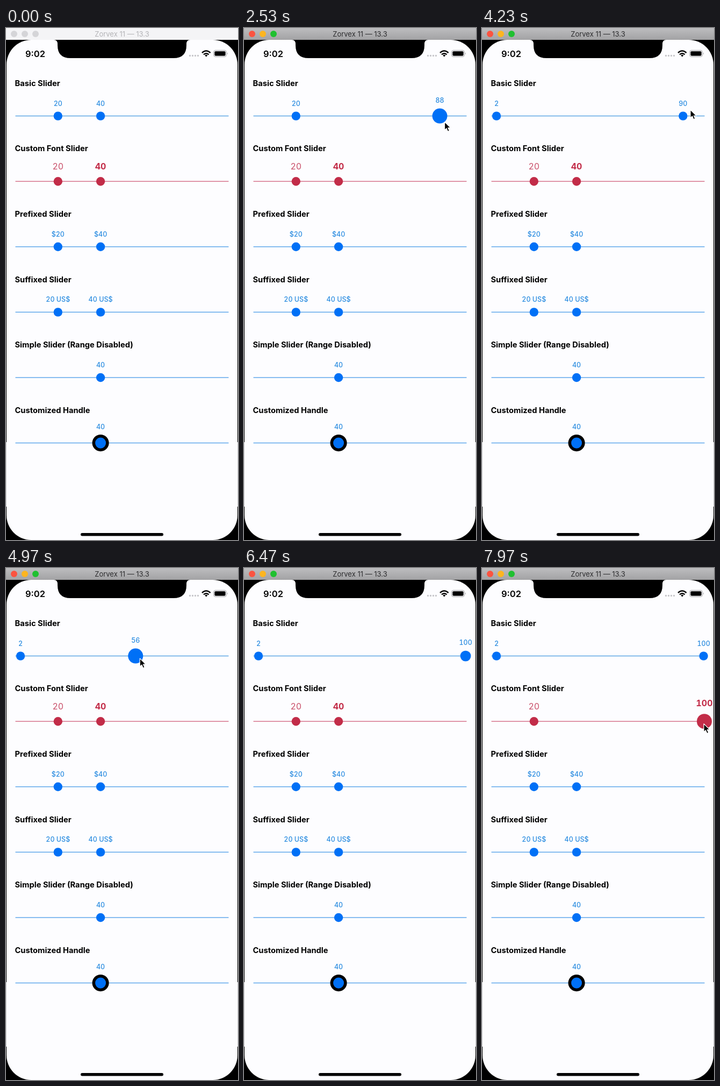
Write an HTML page that moves like this. It is 432 px wide and 952 px high and loops after 8 s.

```html
<!DOCTYPE html>
<html lang="en">
<head>
<meta charset="utf-8">
<title>Range sliders</title>
<style>
  html, body { margin: 0; width: 100%; height: 100%; overflow: hidden; background: #000; }
  svg { display: block; width: 432px; height: 952px; font-family: Inter, "Open Sans", sans-serif; }
  .heading { font-size: 14.7px; font-weight: 700; fill: #000; }
  .label { font-size: 12.5px; font-weight: 500; text-anchor: middle; font-variant-numeric: tabular-nums; }
  .label.large { font-size: 16px; font-weight: 400; }
  .label.bold { font-weight: 700; }
  .clock { font-size: 16.5px; font-weight: 600; }
  .caption { font-size: 13px; text-anchor: middle; }
</style>
</head>
<body>
<svg viewBox="0 0 432 952">
  <defs>
    <linearGradient id="shade" x2="0" y2="1">
      <stop offset="0" stop-color="#bdbdbf"/>
      <stop offset="1" stop-color="#a2a2a4"/>
    </linearGradient>
  </defs>

  <rect width="432" height="952"/>
  <rect y="770" width="432" height="120" fill="#d4d4d8"/>
  <rect x="1" y="22" width="430" height="930" rx="46" fill="#fdfdff"/>
  <path d="M89 22Q96 22 96 30V32Q96 56 120 56H312Q336 56 336 32V30Q336 22 343 22Z"/>
  <rect x="139" y="939" width="154" height="5.5" rx="2.75"/>

  <rect id="bar" width="432" height="22"/>
  <g id="lights"></g>
  <text id="caption" class="caption" x="216" y="16">Zorvex 11 — 13.3</text>

  <text class="clock" x="36" y="53.5">9:02</text>
  <path d="M342.5 51.5H358" stroke="#c6c6ca" stroke-width="3.4" stroke-linecap="round" stroke-dasharray="0 5"/>
  <g fill="none" stroke="#000" stroke-width="2.5">
    <path d="M365 46.2Q372.8 38.8 380.6 46.2"/>
    <path d="M368 49.4Q372.8 45 377.6 49.4"/>
    <path d="M370.2 50.9Q372.8 48.8 375.4 50.9L372.8 53.6Z" fill="#000" stroke="none"/>
  </g>
  <rect x="386.5" y="41.5" width="24" height="12" rx="3.5" fill="none" stroke="#a5a5a9"/>
  <rect x="388.3" y="43.3" width="20.4" height="8.4" rx="2"/>
  <path d="M412 45.5Q414 47.5 412 49.5Z" fill="#a5a5a9"/>

  <g id="sliders"></g>

  <path id="cursor" d="M0 0V15.2L3.5 12L6 17.8L8.8 16.6L6.3 11H11Z" stroke="#fff" stroke-width="1.2" stroke-linejoin="round"/>
</svg>

<script>
const LOOP = 8000, GROW = 300, FOCUS = 750;
const LEFT = 17.5, UNIT = 3.965;
const BLUE = '#0070f6', RED = '#c22c48', LABEL = '#2a8ce0';
const byId = id => document.getElementById(id);
const xOf = value => LEFT + value * UNIT;
const yOf = row => 163.6 + row * 121.6;
const smooth = k => k * k * (3 - 2 * k);

function add(parent, tag, attrs, text = '') {
  const el = document.createElementNS('http://www.w3.org/2000/svg', tag);
  for (const key in attrs) el.setAttribute(key, attrs[key]);
  el.textContent = text;
  return parent.appendChild(el);
}

// Eased position on a path of { t, x, y } stops.
function sample(path, t) {
  const next = path.findIndex(stop => stop.t > t);
  if (next === 0) return path[0];
  if (next < 0) return path.at(-1);
  const a = path[next - 1], b = path[next];
  const k = smooth((t - a.t) / (b.t - a.t));
  return { x: a.x + (b.x - a.x) * k, y: a.y + (b.y - a.y) * k };
}

const ramp = (t, start) => smooth(Math.min(1, Math.max(0, (t - start) / GROW)));

const sliders = [
  { title: 'Basic Slider', line: '#4a9ce0' },
  { title: 'Custom Font Slider', line: '#d2607c', color: RED, lift: 21.8, low: 'large', high: 'large bold' },
  { title: 'Prefixed Slider', prefix: '$' },
  { title: 'Suffixed Slider', suffix: ' US$' },
  { title: 'Simple Slider (Range Disabled)', single: true },
  { title: 'Customized Handle', single: true, ring: true, lift: 26 }
];

function makeHandle(root, s, y, value, high) {
  const lift = s.lift || 19;
  const fill = s.color ? (high ? RED : '#c9506a') : LABEL;
  const ring = s.ring ? { stroke: '#000', 'stroke-width': 5.5 } : {};
  const dot = add(root, 'circle', { cy: y, fill: s.color || BLUE, ...ring });
  const label = add(root, 'text', { class: 'label ' + ((high ? s.high : s.low) || ''), fill });
  const handle = { y, path: [{ t: 0, x: xOf(value), y }], drags: [] };
  handle.draw = t => {
    const { x } = sample(handle.path, t);
    const grow = handle.drags.reduce((sum, d) => sum + ramp(t, d.start) - ramp(t, d.end), 0);
    dot.setAttribute('cx', x);
    dot.setAttribute('r', s.ring ? 12.8 : 8.2 + 5.8 * grow);
    label.setAttribute('x', x);
    label.setAttribute('y', y - lift - 6 * grow);
    label.textContent = (s.prefix || '') + Math.round((x - LEFT) / UNIT) + (s.suffix || '');
  };
  return handle;
}

const rows = sliders.map((s, i) => {
  const y = yOf(i), root = byId('sliders');
  add(root, 'text', { class: 'heading', x: 16.5, y: y - 55.8 }, s.title);
  add(root, 'rect', { x: LEFT, y: y - 0.7, width: 397, height: 1.3, fill: s.line || '#4a9ce8' });
  const low = s.single ? null : makeHandle(root, s, y, 20, false);
  return { low, high: makeHandle(root, s, y, 40, true) };
});
const handles = rows.flatMap(row => [row.low, row.high]).filter(Boolean);

// Each drag moves one handle to a value; the cursor may pass a point on its way there.
const [basic, custom] = rows;
const drags = [
  { handle: basic.high, to: 90, start: 1700, end: 2660, grip: [9, 11], via: { t: 1350, x: 181, y: 165 } },
  { handle: basic.low, to: 2.4, start: 3020, end: 3700, grip: [6, 4] },
  { handle: basic.high, to: 7.4, start: 4560, end: 5500, grip: [8, 4.5], via: { t: 4230, x: 388, y: 152 } },
  { handle: basic.high, to: 99.65, start: 5500, end: 6280, grip: [8, 4.5] },
  { handle: custom.high, to: 100, start: 7280, end: LOOP, grip: [-1, 4.5], via: { t: 6450, x: 445, y: 172 } }
];
drags.at(-1).end = 7860;

const cursorPath = [{ t: 300, x: 300, y: -20 }, { t: FOCUS, x: 236, y: 12 }];
for (const { handle, to, start, end, grip: [dx, dy], via } of drags) {
  const { path, y } = handle;
  const stops = [{ t: start, x: path.at(-1).x, y }, { t: end, x: xOf(to), y }];
  path.push(...stops);
  if (via) cursorPath.push(via);
  cursorPath.push(...stops.map(stop => ({ t: stop.t, x: stop.x + dx, y: y + dy })));
}
for (const drag of drags) {
  // The last handle is still held when the loop restarts.
  const held = drag.handle === custom.high;
  drag.handle.drags.push({ start: drag.start, end: held ? LOOP : drag.end });
}

const lights = ['#fb5340', '#fdb520', '#1fc030'].map((color, i) => ({
  color, dot: add(byId('lights'), 'circle', { cx: 15 + 20 * i, cy: 11, r: 6 })
}));

function draw(t) {
  const active = t >= FOCUS;
  byId('bar').setAttribute('fill', active ? 'url(#shade)' : '#f4f4f6');
  byId('caption').setAttribute('fill', active ? '#2b2b2d' : '#b3b3b6');
  for (const { dot, color } of lights) dot.setAttribute('fill', active ? color : '#d5d5d8');
  for (const handle of handles) handle.draw(t);
  const { x, y } = sample(cursorPath, t);
  byId('cursor').setAttribute('transform', `translate(${x} ${y})`);
}

const start = performance.now();
function tick() {
  draw((performance.now() - start) % LOOP);
  requestAnimationFrame(tick);
}
tick();
</script>
</body>
</html>
```
